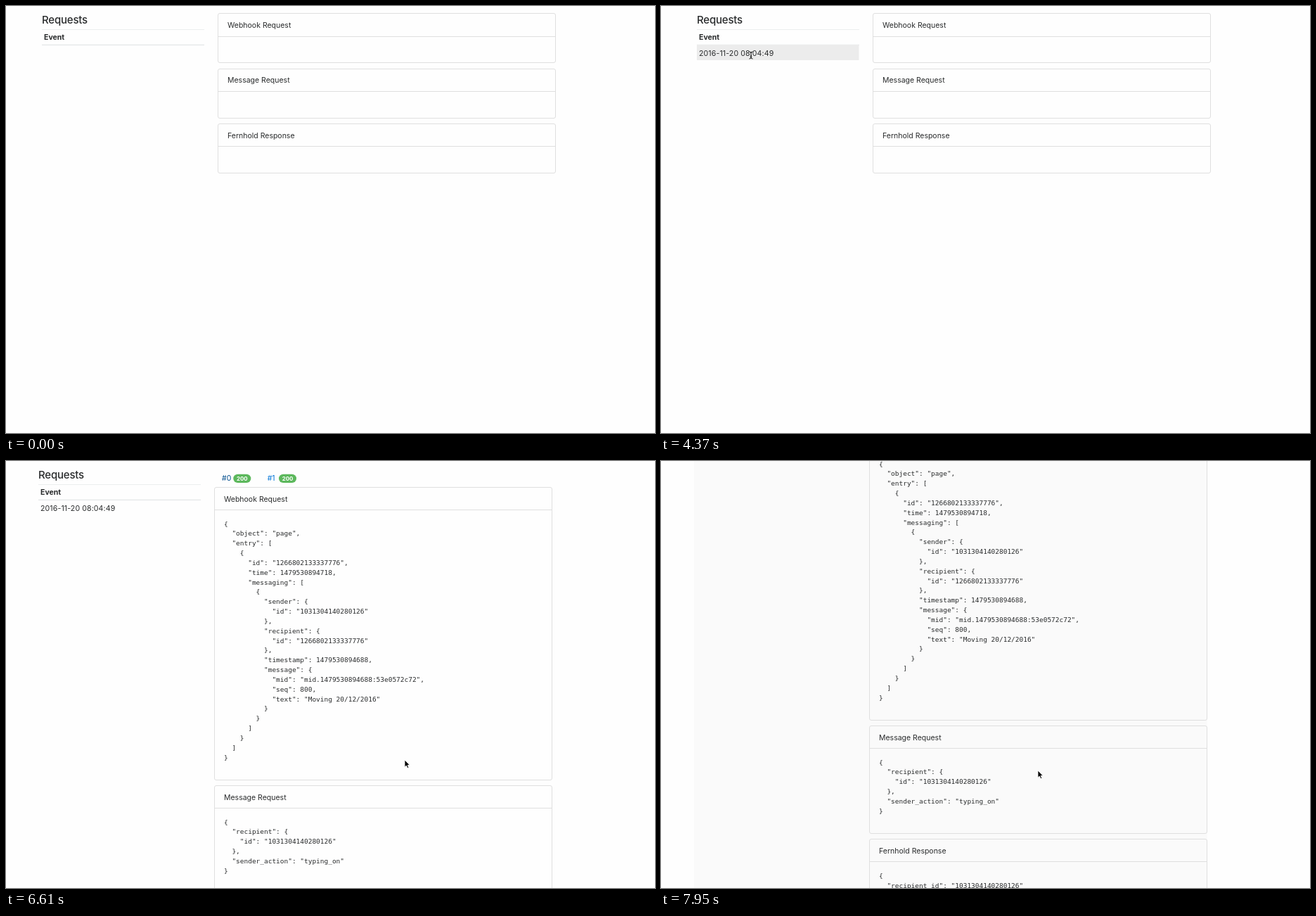
Animation, 923 px wide and 607 px high, one loop 8 s. Source, as an HTML page:

```html
<!DOCTYPE html>
<html lang="en">
<head>
<meta charset="utf-8">
<title>Requests</title>
<style>
html, body { margin: 0; width: 100%; height: 100%; overflow: hidden; background: #fefefe; }
svg { display: block; width: 923px; height: 607px; }
text { font: 10.5px Inter, "Open Sans", sans-serif; fill: #292b2c; }
.title { font-size: 15px; font-weight: 500; letter-spacing: -.2px; }
.head { font-weight: 700; }
.stamp { font-size: 10.6px; letter-spacing: .1px; }
.code { font: 9.47px "DejaVu Sans Mono", monospace; }
.link { fill: #0275d8; }
.link.on { fill: #014c8c; }
.badge { font-size: 7.9px; font-weight: 700; fill: #fff; text-anchor: middle; }
</style>
</head>
<body>
<svg id="stage" viewBox="0 0 923 607"></svg>
<script>
const LOOP = 8000;
const ROW = 2730, OPEN = 4670, SELECT = 6310, SCROLL = 6910;
const LINE = 13.83, CHAR = 5.7;
const stage = document.getElementById('stage');

const user = '1031304140280126', page = '1266802133337776';
const webhook = {
  object: 'page',
  entry: [{
    id: page,
    time: 1479530894718,
    messaging: [{
      sender: { id: user },
      recipient: { id: page },
      timestamp: 1479530894688,
      message: { mid: 'mid.1479530894688:53e0572c72', seq: 800, text: 'Moving 20/12/2016' }
    }]
  }]
};
const message = { recipient: { id: user }, sender_action: 'typing_on' };
const response = { recipient_id: user };

// time, x, y, shape
const pointer = [
  [1340, 867, 106, 'arrow'], [1550, 369, 145, 'arrow'],
  [1850, 300, 143, 'arrow'], [2000, 213, 133, 'arrow'], [2140, 185, 117, 'arrow'], [2290, 169.5, 107, 'arrow'],
  [3630, 142, 98, 'arrow'], [3780, 129, 90, 'arrow'],
  [4080, 128, 83, 'arrow'], [4230, 128, 74, 'beam'], [4370, 128, 70, 'beam'],
  [5120, 300, 95, 'arrow'], [5270, 508, 110, 'arrow'], [5420, 500, 72, 'arrow'],
  [5560, 460, 46, 'arrow'], [5710, 385, 30, 'arrow'], [5860, 322, 22, 'hand'],
  [6310, 340, 60, 'arrow'], [6460, 470, 290, 'arrow'], [6610, 567, 425, 'arrow'],
  [7650, 560, 429, 'arrow'], [7800, 545, 436, 'arrow'], [7950, 536, 440, 'arrow']
];
const scroll = [[0, 0], [SCROLL, 52], [7050, 86], [7800, 85]];

const shapes = {
  arrow: '<path d="M0 0V10.2L2.3 8 4 11.6 5.7 10.9 4.2 7.3H7.2Z" fill="#000" stroke="#fff" stroke-width=".8"/>',
  beam: '<path d="M-2.5-5Q0-5 0-3Q0-5 2.5-5M0-3V3M-2.5 5Q0 5 0 3Q0 5 2.5 5M-1.3 2H1.3" fill="none" stroke="#111"/>',
  hand: '<path d="M-1 1Q0-.6 1 1V5Q2 4 3 5Q4 4.3 5 5.5Q6.5 5 6.5 7V9L5 12H0L-3.4 7.3Q-3.2 5.6-1 7Z" ' +
    'fill="#fff" stroke="#000" stroke-linejoin="round"/><path d="M1 5V7M3 5.5V7.2M5 6V7.5" stroke="#000" stroke-width=".7"/>'
};

const last = (steps, t) => steps.filter(s => s[0] <= t).pop();
const text = (x, y, s, cls = '') => `<text x="${x}" y="${y}" class="${cls}">${s}</text>`;
const rect = (x, y, w, h, fill, more = '') =>
  `<rect x="${x}" y="${y}" width="${w}" height="${h}" fill="${fill}" ${more}/>`;

function code(data, x, y) {
  return JSON.stringify(data, null, 2).split('\n').map((line, i) => {
    const s = line.trimStart();
    return text(x + (line.length - s.length) * CHAR, y + i * LINE, s, 'code');
  });
}

function cards(y, list) {
  return list.map(([name, data]) => {
    const lines = data ? code(data, 315, y + 55.3) : [];
    const h = 70 + (lines.length * LINE), top = Math.floor(y) + .5;
    const out = rect(301.5, top, 480, Math.round(h), 'none', 'rx="2.5" stroke="#dfdfdf"') +
      rect(302, Math.floor(y + 32.2), 479, 1, '#dfdfdf') +
      text(315, y + 20.2, name) +
      (name === list[2][0] ? lines.slice(0, 2) : lines).join('');
    y += h + 8.3;
    return out;
  }).join('');
}

function tab(x, name, cls) {
  return text(x, 28, name, 'link ' + cls) +
    rect(x + 16.3, 18.7, 25, 12.4, '#5cb85c', 'rx="6.2"') +
    text(x + 28.8, 27.8, '200', 'badge');
}

function events(t) {
  const hover = t >= 4230 && t < 5120;
  return text(51, 25, 'Requests', 'title') +
    rect(51, 33, 231, 1, '#eceeef') +
    text(54, 48, 'Event', 'head') +
    rect(51, 54.7, 231, 1.3, '#e4e6e8') +
    (hover ? rect(51, 55, 230.5, 22, '#ececec') : '') +
    (t >= ROW ? text(54, 70.5, '2016-11-20 08:04:49', 'stamp') : '');
}

function tint(t) {
  if (t >= SCROLL) return rect(47, 0, 730, 607, '#fafafa');
  if (t >= OPEN && t < SELECT) return rect(301, 11, 480.5, 596, '#fafafa');
  return '';
}

function draw(t) {
  const open = t >= OPEN, picked = t >= SELECT;
  const tabs = open ? tab(312, '#0', t >= 5860 ? 'on' : '') + tab(376.7, '#1', '') : '';
  const list = cards(open ? 37.3 : 10.8, [
    ['Webhook Request', open && webhook],
    ['Message Request', picked && message],
    ['Fernhold Response', picked && response]
  ]);
  const p = last(pointer, t);
  return tint(t) +
    `<g transform="translate(${picked ? -5 : 0} ${-last(scroll, t)[1]})">${events(t)}${tabs}${list}</g>` +
    (p ? `<g transform="translate(${p[1]} ${p[2]})">${shapes[p[3]]}</g>` : '');
}

let shown = '';
function tick(now) {
  const next = draw(now % LOOP);
  if (next !== shown) stage.innerHTML = shown = next;
  requestAnimationFrame(tick);
}
tick(performance.now());
</script>
</body>
</html>
```
